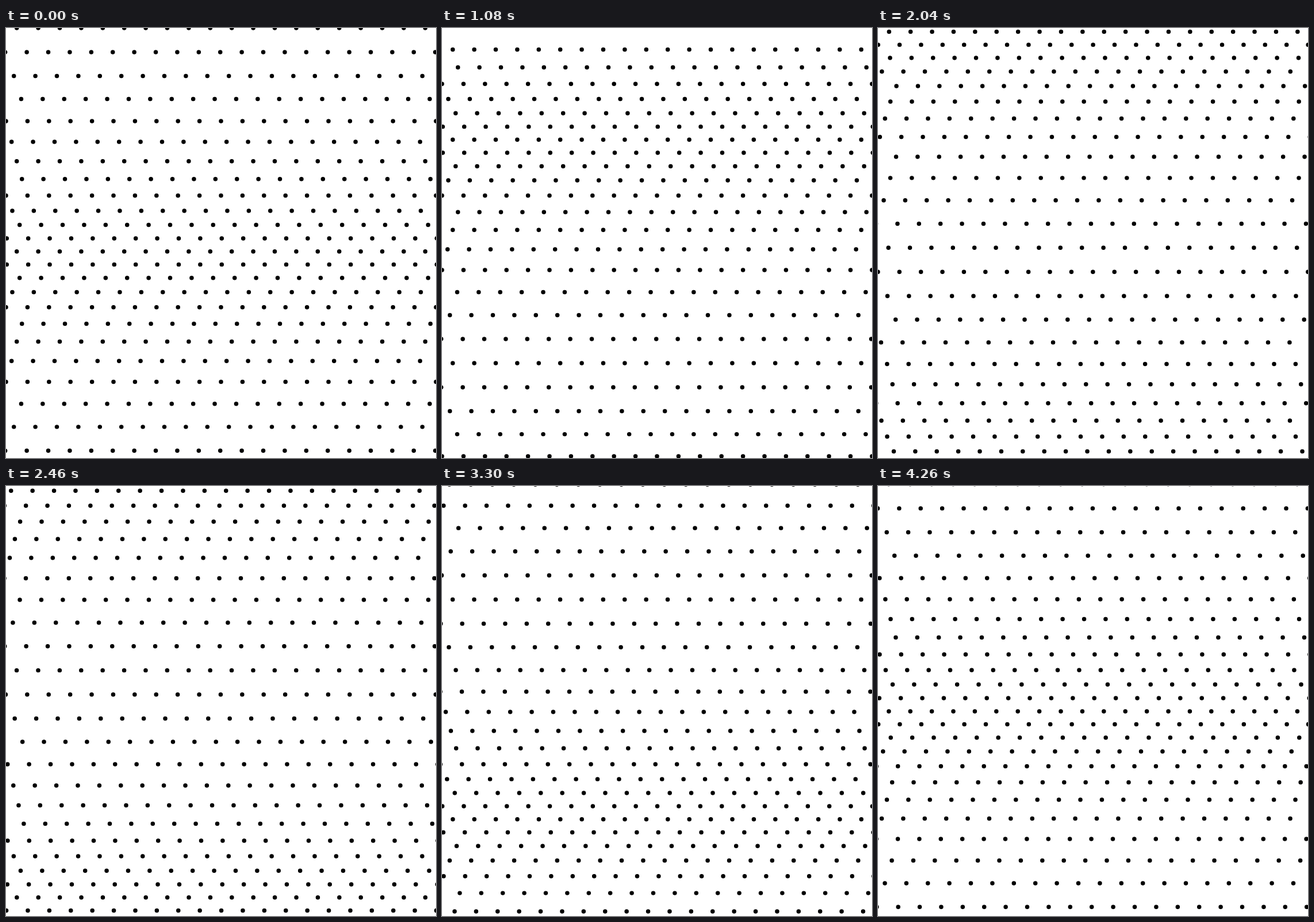
These frames come from a looping animation (748 px wide and 748 px high, 4.32 s). An HTML page with a canvas:

```html
<!DOCTYPE html>
<html lang="en">
<head>
<meta charset="utf-8">
<title>Dot wave</title>
<style>
  html, body { margin: 0; height: 100%; overflow: hidden; background: #fff; }
  canvas { display: block; }
</style>
</head>
<body>
<canvas id="stage" width="748" height="748"></canvas>
<script>
const SIZE = 748, GAP = SIZE / 20, ROW_GAP = GAP * Math.sqrt(3) / 2;
const ROWS = 25, DOT = GAP / 10;
const STEP_MS = 60, STEPS = 72;
const ctx = document.getElementById('stage').getContext('2d');

// Each dot of a triangular grid circles its rest point; rows lag by 1/24 turn.
function draw(step) {
  ctx.fillStyle = '#fff';
  ctx.fillRect(0, 0, SIZE, SIZE);
  ctx.fillStyle = '#000';
  ctx.beginPath();
  for (let row = 0; row < ROWS; row++) {
    const angle = 2 * Math.PI * ((row - 12) / 24 + step / STEPS);
    const y = row * ROW_GAP - GAP * Math.sin(angle);
    const shift = (row % 2 ? 0 : GAP / 2) + GAP * (1 - Math.cos(angle));
    for (let x = shift % GAP - GAP; x < SIZE + GAP; x += GAP) {
      ctx.moveTo(x + DOT, y);
      ctx.arc(x, y, DOT, 0, 2 * Math.PI);
    }
  }
  ctx.fill();
}

function tick() {
  draw(Math.floor(performance.now() / STEP_MS) % STEPS);
  requestAnimationFrame(tick);
}
tick();
</script>
</body>
</html>
```
